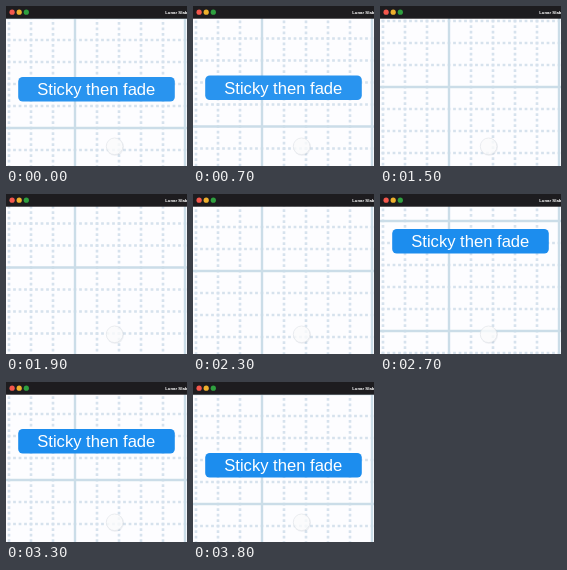
Recreate the animation shown at these times as an HTML page. Size 181 by 160 pixels, loop 4000 ms.

```html
<!DOCTYPE html>
<html lang="en">
<head>
<meta charset="utf-8">
<title>Sticky then fade</title>
<style>
  html, body { margin: 0; width: 100%; height: 100%; overflow: hidden; background: #fdfdff; }
  svg { display: block; width: 181px; height: 160px; }
  text { fill: #fff; font-family: "Liberation Sans", Arial, sans-serif; }
  .minor { stroke: #d6e2ed; stroke-width: 2.6; stroke-dasharray: 2.75 2.75; }
  .major { stroke: #cbdde8; stroke-width: 2.4; }
</style>
</head>
<body>
<svg viewBox="0 0 181 160">
  <rect width="181" height="160" fill="#fdfdff"/>
  <g id="grid"></g>
  <g id="button">
    <rect id="face" x="12.2" width="156.6" height="24.6" rx="4.6"/>
    <text x="90.3" y="18.2" font-size="16.6" text-anchor="middle">Sticky then fade</text>
  </g>
  <g>
    <circle cx="109.2" cy="141" r="8.8" fill="#8796a0" opacity=".13"/>
    <circle cx="108.6" cy="140.3" r="8.3" fill="#fff" fill-opacity=".76" stroke="#e2e6ea" stroke-width=".7"/>
  </g>
  <rect width="181" height="12.7" fill="#1d1c1f"/>
  <circle cx="6.1" cy="6.2" r="2.6" fill="#f4574c"/>
  <circle cx="13.2" cy="6.2" r="2.6" fill="#eeb02d"/>
  <circle cx="20.3" cy="6.2" r="2.6" fill="#2fa03f"/>
  <text x="159.2" y="7.8" font-size="4.3" font-weight="700">Lunar Slab</text>
</svg>
<script>
  const LOOP = 4000, STEP = 100, CELL = 22, BLOCK = CELL * 5;
  const REST_TOP = 71, STUCK_TOP = 35, FADE_FROM = 98, FADE_TO = 142;

  // Scroll distance at each 100 ms step, from the given start time.
  const moves = [
    { start: 700, at: [1.5, 5, 14, 33, 61, 91, 117, 137, 151, 155, 157, 158, 158.5] },
    { start: 2100, at: [158, 157, 155, 147, 133, 115, 95, 78, 63, 50, 40, 31, 24, 17.5, 12, 7, 3, 0] }
  ];

  const byId = id => document.getElementById(id);
  const grid = byId('grid'), button = byId('button'), face = byId('face');
  const clamp = v => Math.max(0, Math.min(1, v));

  function addLine(x1, y1, x2, y2, major) {
    const line = document.createElementNS('http://www.w3.org/2000/svg', 'line');
    Object.entries({ x1, y1, x2, y2, class: major ? 'major' : 'minor' })
      .forEach(([key, value]) => line.setAttribute(key, value));
    // Half a dash, so that dots sit on the crossings.
    if (!major) line.setAttribute('stroke-dashoffset', 1.375);
    grid.append(line);
  }

  // Minor lines first, so the solid ones lie on top.
  for (const major of [false, true]) {
    for (let i = -10; i <= 10; i++) {
      if ((i % 5 === 0) !== major) continue;
      const p = i * CELL, x = 69 + p;
      if (x > -3 && x < 184) addLine(x, -2 * BLOCK, x, 2 * BLOCK, major);
      addLine(69 - BLOCK, p, 69 + 2 * BLOCK, p, major);
    }
  }

  function scrollAt(t) {
    const move = moves.filter(m => t >= m.start).pop();
    if (!move) return 0;
    const i = Math.floor((t - move.start) / STEP);
    return move.at[Math.min(i, move.at.length - 1)];
  }

  function draw(t) {
    const scroll = scrollAt(t);
    const gridY = (122 - scroll + BLOCK) % BLOCK;
    const top = Math.max(STUCK_TOP, REST_TOP - scroll);
    grid.setAttribute('transform', `translate(0 ${gridY})`);
    button.setAttribute('transform', `translate(0 ${top})`);
    button.setAttribute('opacity', clamp((FADE_TO - scroll) / (FADE_TO - FADE_FROM)));
    face.setAttribute('fill', t < 2000 ? '#2994ef' : '#1c8dee');
  }

  const begin = performance.now();
  function tick() {
    draw((performance.now() - begin) % LOOP);
    requestAnimationFrame(tick);
  }
  tick();
</script>
</body>
</html>
```
